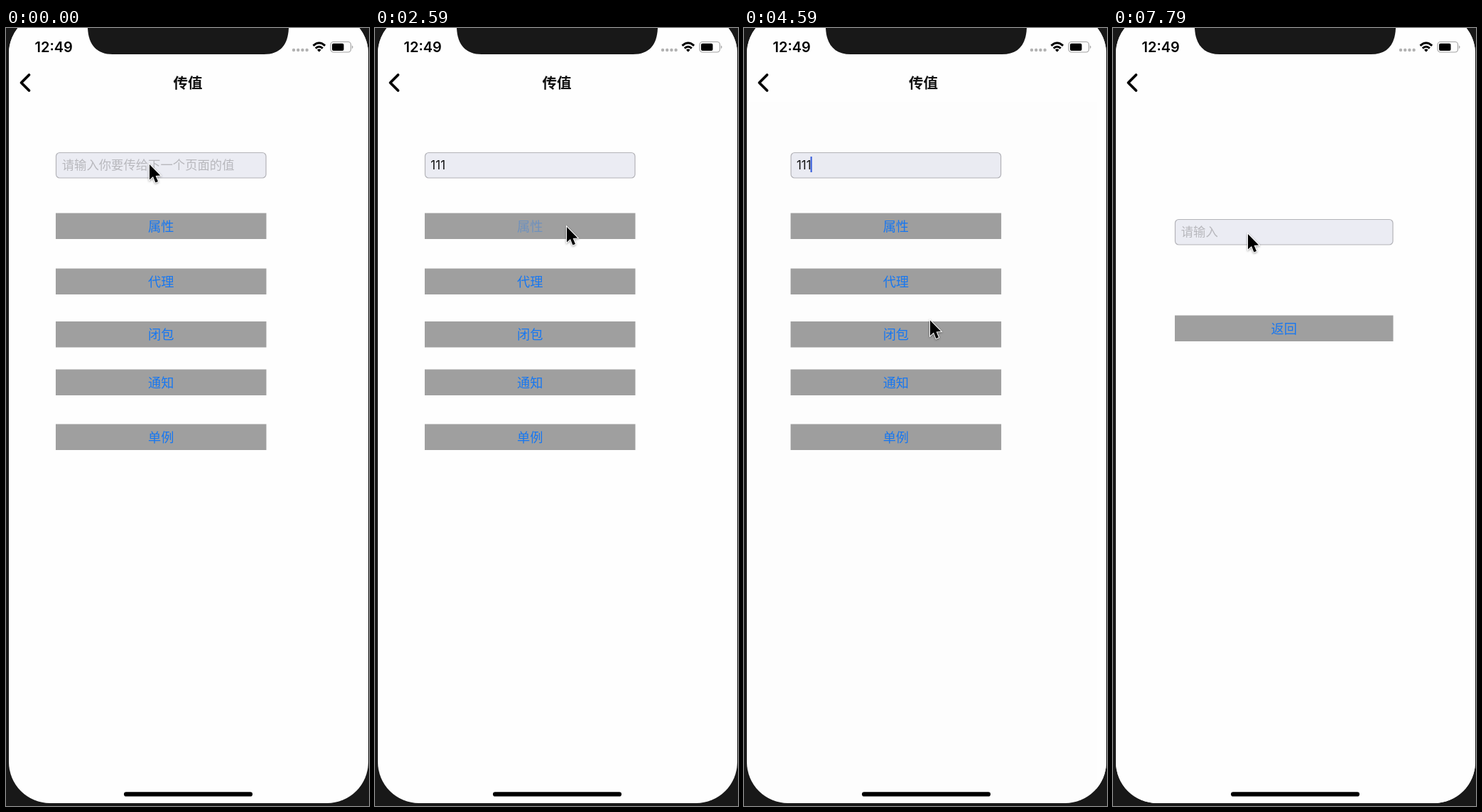
An HTML page for the animation above (7990 ms loop, 511 by 1095 pixels).

```html
<!DOCTYPE html>
<html lang="zh">
<head>
<meta charset="utf-8">
<title>传值</title>
<style>
  html, body { margin: 0; width: 100%; height: 100%; overflow: hidden; background: #181818; }
  svg { display: block; width: 511px; height: 1095px; }
  text { font-family: Inter, "Noto Sans CJK SC", "Noto Sans CJK", sans-serif; }
  .mid { text-anchor: middle; }
  .button { fill: #9f9f9f; }
  .label { fill: #1677f2; font-size: 18.2px; text-anchor: middle; }
  .label.pressed { fill: #6f91bd; }
  .field { fill: #ebecf3; stroke: #b3b3b8; stroke-width: 1.2; }
  .hint { fill: #b8b8bd; font-size: 17.35px; }
  .value { fill: #111; font-size: 17px; }
</style>
</head>
<body>
<svg viewBox="0 0 511 1095">
  <defs>
    <clipPath id="screen"><rect x="4" y="-22" width="506" height="1113" rx="58"/></clipPath>
  </defs>
  <g clip-path="url(#screen)">
    <rect width="511" height="1095" fill="#fefefe"/>
    <g id="first"></g>
    <rect id="dim" y="104" width="511" height="991"/>
    <g id="second"><rect x="4" y="104" width="507" height="991" fill="#fefefe"/></g>
    <rect width="511" height="104" fill="#fefefe"/>
    <text id="title" class="mid" x="256" y="84.7" font-size="20.5" font-weight="600" fill="#111">传值</text>
    <path id="back" d="M32.5 66 21.5 77 32.5 88" fill="none" stroke="#000" stroke-width="3.8" stroke-linecap="round" stroke-linejoin="round"/>
    <text x="40.5" y="34" font-size="20" font-weight="600">12:49</text>
    <path d="M405 31h19" stroke="#b2b2b2" stroke-width="4.4" stroke-linecap="round" stroke-dasharray="0 6.2"/>
    <g fill="none" stroke="#000" stroke-width="3">
      <path d="M432.5 24.8q8.3-7.6 16.6 0M435.8 28.6q5-4.6 10 0"/>
      <path d="M438 30.8q2.8-2.4 5.6 0L440.8 33.8Z" fill="#000" stroke="none"/>
    </g>
    <rect x="457" y="19.5" width="28.5" height="14.5" rx="4" fill="none" stroke="#a4a4a4" stroke-width="1.2"/>
    <rect x="459" y="21.7" width="16.5" height="10.2" rx="2" fill="#000"/>
    <path d="M487 24.5q3 2.2 0 4.8Z" fill="#a4a4a4"/>
    <rect x="166" y="1075.3" width="181" height="6.2" rx="3.1"/>
  </g>
  <path d="M115 0C116 24 128 37 150 37H363C386 37 397 24 398 0Z" fill="#181818"/>
  <path id="pointer" d="M0 0V21.5L5 17 8.4 25.5 12 24 8.6 15.9 15.2 15.5Z" stroke="#fff" stroke-width="2" paint-order="stroke"
    style="filter: drop-shadow(0 1px 1.5px #0006)"/>
</svg>
<script>
const LOOP = 7990, STEP = 200, WIDTH = 507;
const $ = id => document.getElementById(id);

function add(parent, tag, attrs, content = '') {
  const node = document.createElementNS('http://www.w3.org/2000/svg', tag);
  for (const key in attrs) node.setAttribute(key, attrs[key]);
  node.textContent = content;
  parent.append(node);
  return node;
}

function addButton(page, x, y, width, name) {
  add(page, 'rect', { class: 'button', x, y, width, height: 36.5 });
  return add(page, 'text', { class: 'label', x: x + width / 2, y: y + 25.2 }, name);
}

function addField(page, x, y, width, hint) {
  add(page, 'rect', { class: 'field', x: x + .5, y: y + .5, width: width - 1, height: 35.5, rx: 5 });
  return {
    hint: add(page, 'text', { class: 'hint', x: x + 8.7, y: y + 24.2 }, hint),
    value: add(page, 'text', { class: 'value', x: x + 8.3, y: y + 23.8 })
  };
}

function setValue(field, value) {
  field.value.textContent = value;
  field.hint.style.opacity = value ? 0 : 1;
}

const first = $('first'), second = $('second');
const input = addField(first, 70, 175, 296.5, '请输入你要传给下一个页面的值');
const caret = add(first, 'rect', { y: 181, width: 2.2, height: 22, fill: '#3d63dc' });
const [byProperty, byDelegate] = [['属性', 260.5], ['代理', 338.5], ['闭包', 413], ['通知', 480.5], ['单例', 557.5]]
  .map(([name, y]) => addButton(first, 70, y, 296.5, name));
const output = addField(second, 87, 269, 307.5, '请输入');
const goBack = addButton(second, 87, 404.5, 307.5, '返回');

// Page changes: start time, direction, tapped button
const taps = [
  { at: 2590, push: true, label: byProperty },
  { at: 4294, push: false, label: goBack },
  { at: 6906, push: true, label: byDelegate }
];

// Pointer stops: time, x, y
const stops = [
  [0, 202, 192], [1790, 202, 192], [2390, 270, 280], [3190, 270, 280], [3990, 262, 411.5],
  [4790, 262, 411.5], [6390, 224, 352], [7190, 224, 352], [7690, 190, 290], [LOOP, 190, 290]
];

const ease = u => u * u * (3 - 2 * u);

// Critically damped spring, 0 to 1
function spring(ms) {
  const u = Math.max(0, ms) * .01826;
  return 1 - Math.exp(-u) * (1 + u);
}

function pointerAt(t) {
  const i = Math.max(1, stops.findIndex(stop => stop[0] >= t));
  const [t0, x0, y0] = stops[i - 1], [t1, x1, y1] = stops[i];
  const u = ease((t - t0) / (t1 - t0));
  return [x0 + (x1 - x0) * u, y0 + (y1 - y0) * u];
}

function pushedAt(t) {
  const last = taps.filter(tap => t >= tap.at).pop();
  if (!last) return 0;
  return last.push ? spring(t - last.at) : 1 - spring(t - last.at);
}

const move = (node, x, y = 0) => node.setAttribute('transform', `translate(${x} ${y})`);

function render(t) {
  const p = pushedAt(t);
  move(first, -.3 * WIDTH * p);
  move(second, WIDTH * (1 - p));
  $('dim').style.opacity = .13 * p;
  move($('title'), -227 * p ** 1.185);
  $('title').style.opacity = 1 - p ** 1.3;
  $('back').style.opacity = 1 - .8 * p * (1 - p);

  const typed = '1'.repeat(Math.max(0, Math.min(3, Math.floor((t - 590) / 200))));
  setValue(input, typed);
  setValue(output, t < 5000 ? '111' : '');
  const focused = (t >= 390 && t < 2590) || (t >= 4294 && t < 6790);
  const blinkOn = t < 1800 || (t - 1590) % 1000 < 600;
  caret.style.opacity = focused && blinkOn ? 1 : 0;
  caret.setAttribute('x', 78 + (typed ? input.value.getComputedTextLength() - .8 : 0));

  for (const { at, label } of taps)
    label.classList.toggle('pressed', t > at - 100 && t < at + 200);
  move($('pointer'), ...pointerAt(t));
}

function tick() {
  const t = performance.now() % LOOP;
  render(Math.max(0, Math.floor((t + 10) / STEP) * STEP - 10));
  requestAnimationFrame(tick);
}
tick();
</script>
</body>
</html>
```
